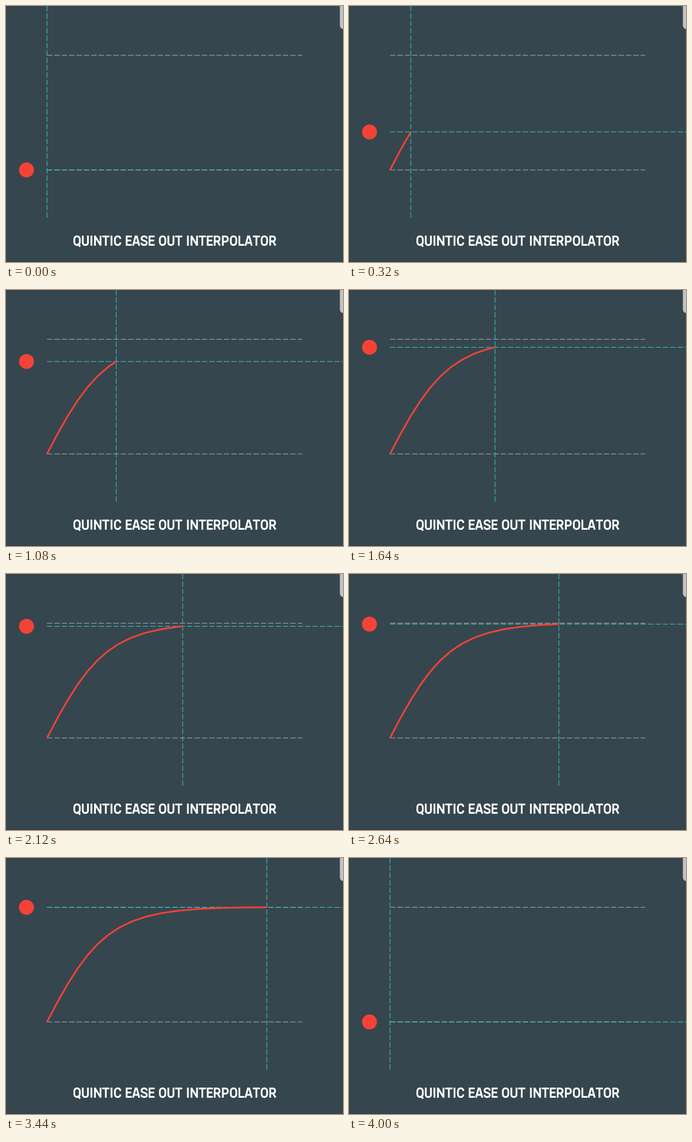
A matplotlib script that plays this animation: 600x456 px, repeating every 4.04 s.

```python
import numpy as np
import matplotlib.pyplot as plt
from matplotlib.animation import FuncAnimation
from matplotlib.patches import Circle, FancyBboxPatch, PathPatch, Rectangle
from matplotlib.path import Path

W, H, DPI = 600, 456, 96
PT = 72 / DPI  # points per pixel
FRAMES, STEP, DURATION, LAG = 101, 40, 4000, 6

LEFT, RIGHT, TOP, BASE = 73, 527.4, 87.7, 292
BG, RED, CYAN, GRAY = "#36464e", "#f44336", "#36bcbc", "#98a4a8"

plt.rcParams["lines.scale_dashes"] = False
fig = plt.figure(figsize=(W / DPI, H / DPI), dpi=DPI, facecolor=BG)
ax = fig.add_axes([0, 0, 1, 1])
ax.set(xlim=(0, W), ylim=(H, 0))
ax.axis("off")

# Ease-out curve: cubic Bezier (.23, 1, .32, 1) flattened to 16 segments
s = np.linspace(0, 1, 17)
KNOT_P = 3 * s * (1 - s) ** 2 * 0.23 + 3 * s ** 2 * (1 - s) * 0.32 + s ** 3
KNOT_V = 1 - (1 - s) ** 3


def to_x(p):
    return LEFT + (RIGHT - LEFT) * p


def to_y(p):
    return BASE + (TOP - BASE) * np.interp(p, KNOT_P, KNOT_V)


def dashed(xs, ys, color, z):
    line, = ax.plot(xs, ys, color=color, lw=1.2 * PT, zorder=z, snap=False,
                    linestyle=(0, (9.6 * PT, 3.525 * PT)), dash_capstyle="butt")
    return line


# Condensed capitals: advance width and strokes, baseline at 0, y up
STEM = "M 2.9 0 L 2.9 18 "
BOWL = ("M 7.5 16.7 C 10.7 16.7 12.4 14.6 12.4 11 L 12.4 7 "
        "C 12.4 3.4 10.7 1.3 7.5 1.3 C 4.3 1.3 2.6 3.4 2.6 7 "
        "L 2.6 11 C 2.6 14.6 4.3 16.7 7.5 16.7 L 7.7 16.7 ")
GLYPHS = {
    " ": (6.2, ""),
    "A": (14.6, "M 1.7 0 L 6.6 18 M 12.9 0 L 8 18 M 3.2 5.2 L 11.4 5.2"),
    "C": (14.4, "M 12.2 12.1 C 12.2 15.2 10.6 16.7 7.5 16.7 "
                "C 4.3 16.7 2.6 14.6 2.6 11 L 2.6 7 "
                "C 2.6 3.4 4.3 1.3 7.5 1.3 C 10.6 1.3 12.2 2.8 12.2 5.9"),
    "E": (12.5, STEM + "M 2.9 16.5 L 12 16.5 M 2.9 9.3 L 11.1 9.3 "
                       "M 2.9 1.5 L 12 1.5"),
    "I": (6.9, "M 3.45 0 L 3.45 18"),
    "L": (12, STEM + "M 2.9 1.5 L 11.8 1.5"),
    "N": (15.6, STEM + "M 12.8 0 L 12.8 18 M 2.9 17 L 12.8 1"),
    "O": (15, BOWL),
    "P": (14.4, STEM + "M 2.9 16.5 L 7.2 16.5 C 10.2 16.5 11.7 14.9 11.7 11.9 "
                       "C 11.7 8.7 10.2 7.2 7.2 7.2 L 2.9 7.2"),
    "Q": (15, BOWL + "M 8.3 3.6 L 13 -1.6"),
    "R": (14.5, STEM + "M 2.9 16.5 L 7 16.5 C 10 16.5 11.5 15.2 11.5 12.2 "
                       "C 11.5 9.2 10 7.9 7 7.9 L 2.9 7.9 M 7.6 8.2 L 12.3 0.3"),
    "S": (13.6, "M 11.6 12.6 C 11.6 15.2 10 16.7 7 16.7 "
                "C 4 16.7 2.3 15.2 2.3 13 C 2.3 10.7 4.2 9.8 6.9 9 "
                "C 10 8.1 11.6 7 11.6 4.8 C 11.6 2.5 9.8 1.3 7 1.3 "
                "C 3.8 1.3 2.1 2.8 2.1 5.4"),
    "T": (13.3, "M 0.3 16.5 L 13 16.5 M 6.65 0 L 6.65 18"),
    "U": (14.6, "M 2.7 18 L 2.7 5.8 C 2.7 2.8 4.3 1.3 7.3 1.3 "
                "C 10.3 1.3 11.9 2.8 11.9 5.8 L 11.9 18"),
}
CODES = {"M": [Path.MOVETO], "L": [Path.LINETO], "C": [Path.CURVE4] * 3}


def lettering(text, cx, baseline):
    x = cx - sum(GLYPHS[c][0] for c in text) / 2
    verts, codes = [], []
    for c in text:
        width, strokes = GLYPHS[c]
        tokens = strokes.split()
        nums = [float(t) for t in tokens if t not in CODES]
        verts += [(x + a, baseline - b) for a, b in zip(nums[::2], nums[1::2])]
        for t in tokens:
            codes += CODES.get(t, [])
        x += width
    ax.add_patch(PathPatch(Path(verts, codes), fill=False, edgecolor="white",
                           lw=3.1 * PT, capstyle="butt", joinstyle="miter",
                           snap=False))


dashed([LEFT, RIGHT], [TOP, TOP], GRAY, 1)
dashed([LEFT, RIGHT], [BASE, BASE], GRAY, 1)
level = dashed([LEFT, W], [BASE, BASE], CYAN, 2)
cursor = dashed([LEFT, LEFT], [0, 377], CYAN, 2)
curve, = ax.plot([], [], color=RED, lw=3 * PT, zorder=3,
                 solid_capstyle="butt", solid_joinstyle="round")
ball = ax.add_patch(Circle((36.5, BASE), 13.3, color=RED, lw=0, zorder=3))
ax.add_patch(FancyBboxPatch((594.5, -20), 30, 61, lw=0, color="#c2c5c7",
                            boxstyle="round,pad=0,rounding_size=7"))
ax.add_patch(Rectangle((0, H - 1), W, 1, lw=0, color="#303e46"))
lettering("QUINTIC EASE OUT INTERPOLATOR", 300.5, 427)


def draw(i):
    t = i * STEP
    p = (t + LAG) / DURATION if 0 < t < DURATION else 0
    x, y = to_x(p), to_y(p)
    cursor.set_xdata([x, x])
    level.set_ydata([y, y])
    ball.center = (36.5, y)
    trail = np.append(KNOT_P[KNOT_P < p], p)
    curve.set_data(to_x(trail), to_y(trail))
    return cursor, level, ball, curve


anim = FuncAnimation(fig, draw, frames=FRAMES, interval=STEP,
                     repeat=True, repeat_delay=0)
plt.show()
```
